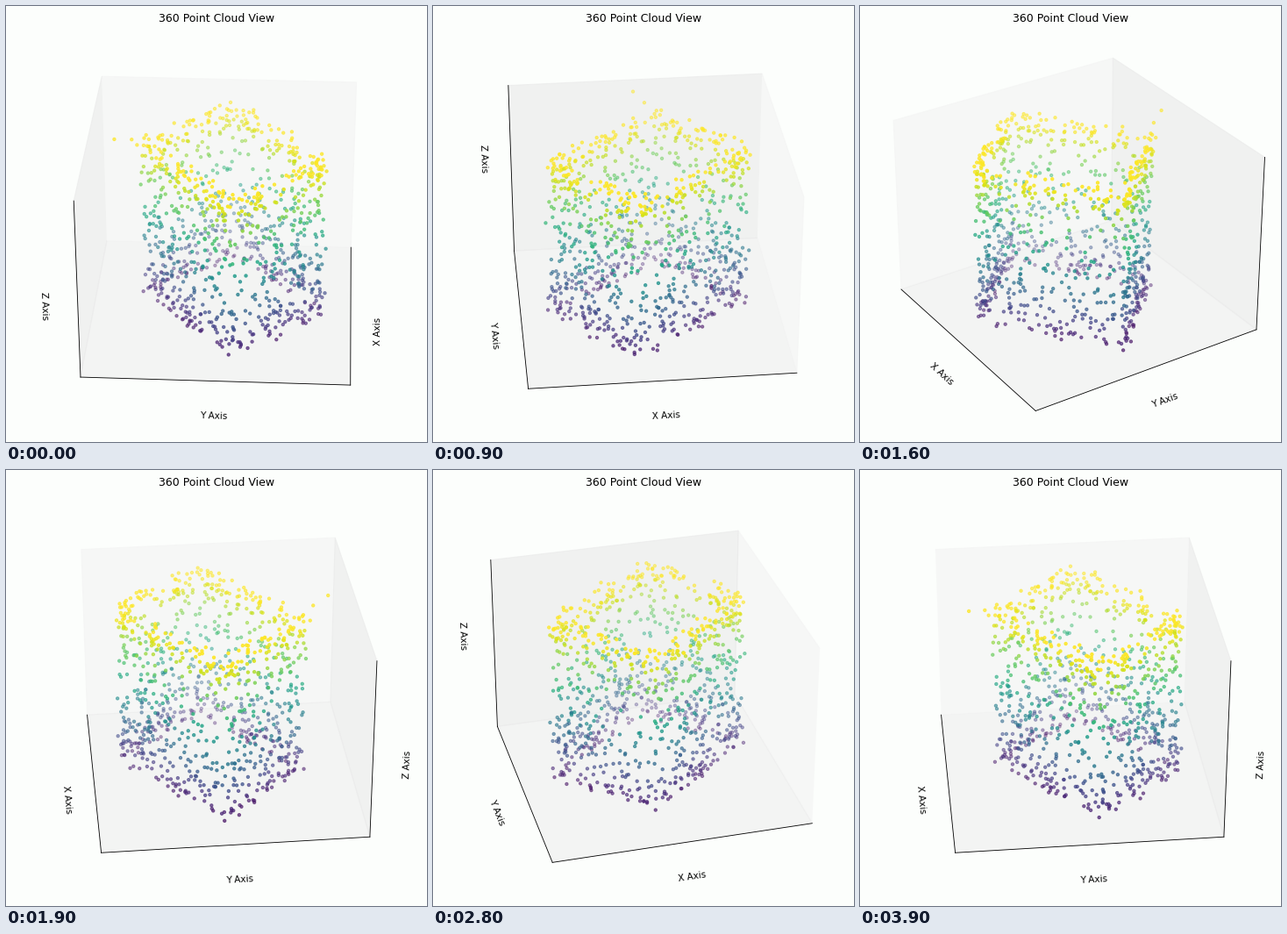
A matplotlib script for the animation above (4000 ms loop, 480 by 497 pixels).

```python
import numpy as np
import matplotlib.pyplot as plt
from matplotlib.animation import FuncAnimation

WIDTH, HEIGHT, DPI = 480, 497, 75
FRAMES, INTERVAL = 40, 100
START, STEP, ELEV = 3, 9, 30  # degrees
HALF, HALF_Z = 0.5952, 0.4464
PAPER = "#fcfefc"

# Corners of the hollow column's floor plan, in order
CORNERS = np.array([(0.457, 0.062), (0.094, 0.465), (-0.44, 0.04), (-0.07, -0.36)])
STRAYS = np.array([(0.025, -0.478, 0.443), (-0.02, -0.405, 0.42)])


def column(count, rng):
    """Scatter points over the four walls, denser near the top and bottom."""
    ends = np.roll(CORNERS, -1, axis=0)
    lengths = np.hypot(*(ends - CORNERS).T)
    wall = rng.choice(4, count, p=lengths / lengths.sum())
    along = rng.random((count, 1))
    xy = CORNERS[wall] + along * (ends - CORNERS)[wall]
    xy += rng.normal(0, 0.01, xy.shape)
    z = rng.uniform(-0.41, 0.41, count)
    pick = rng.random(count)
    top, bottom = pick < 0.14, pick > 0.86
    z[top] = rng.uniform(0.29, 0.42, top.sum())
    z[bottom] = rng.uniform(-0.42, -0.25, bottom.sum())
    return np.column_stack([xy, z])


points = np.vstack([column(1000, np.random.default_rng(7)), STRAYS])
x, y, z = points.T
colors = plt.get_cmap("viridis")(plt.Normalize(-0.46, 0.36)(z))

plt.rcParams["font.family"] = "DejaVu Sans"
fig = plt.figure(figsize=(WIDTH / DPI, HEIGHT / DPI), dpi=DPI, facecolor=PAPER)
side = 465
ax = fig.add_axes([7.7 / WIDTH, 7.7 / HEIGHT, side / WIDTH, side / HEIGHT],
                  projection="3d", facecolor=PAPER)
cloud = ax.scatter(x, y, z, c=colors, s=10, depthshade=False)
ax.set(xlim=(-HALF, HALF), ylim=(-HALF, HALF), zlim=(-HALF_Z, HALF_Z),
       xticks=[], yticks=[], zticks=[],
       xlabel="X Axis", ylabel="Y Axis", zlabel="Z Axis")
ax.set_title("360 Point Cloud View", fontsize=12)


def update(frame):
    azim = START + STEP * frame
    ax.view_init(elev=ELEV, azim=azim)
    # Points fade with their distance from the viewer
    a, e = np.radians([azim, ELEV])
    depth = np.cos(e) * (x * np.cos(a) + y * np.sin(a)) + np.sin(e) * z
    near = (depth - depth.min()) / np.ptp(depth)
    faded = colors.copy()
    faded[:, 3] = 0.9 * (0.3 + 0.7 * near)
    cloud.set_facecolor(faded)
    return [cloud]


anim = FuncAnimation(fig, update, frames=FRAMES, interval=INTERVAL,
                     repeat=True, repeat_delay=0, blit=False)
plt.show()
```
